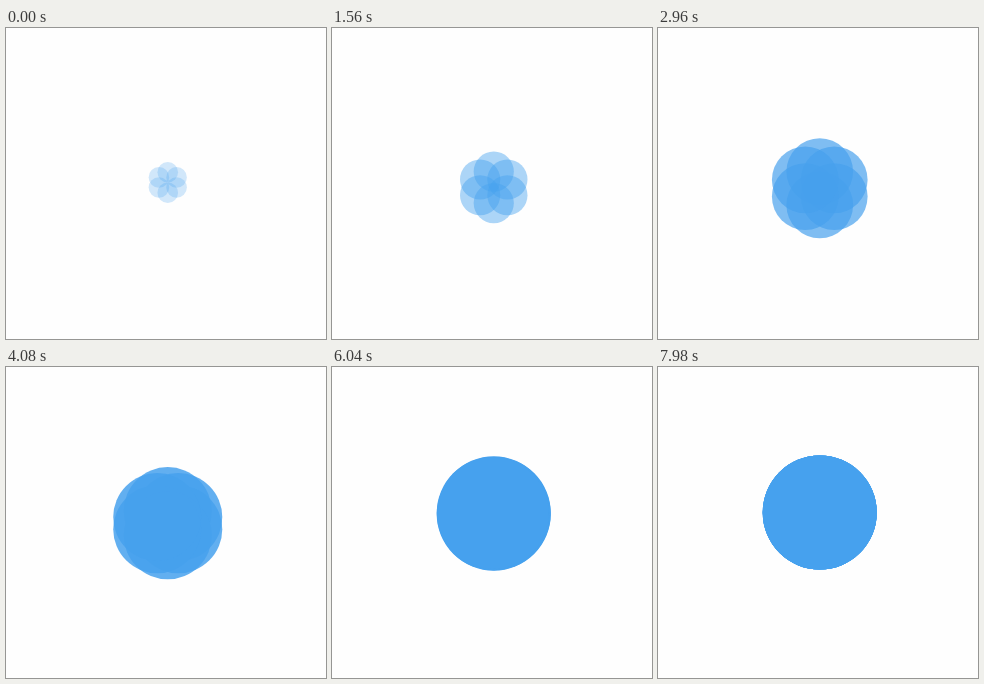
An HTML page that plays this animation: 320 px wide and 311 px high, repeating every 8 s.

```html
<!DOCTYPE html>
<html lang="en">
<head>
<meta charset="utf-8">
<title>Breathing flower</title>
<style>
  html, body { margin: 0; width: 100%; height: 100%; overflow: hidden; background: #fefefe; }
  svg { display: block; width: 100%; height: 100%; }
</style>
</head>
<body>
<svg viewBox="0 0 320 311" fill="#46a1ee"></svg>
<script>
const LOOP = 8;            // seconds
const PETALS = 6;
const FULL_RADIUS = 57;
const CENTER = { x: 161.75, y: 145.5 };

const svg = document.querySelector('svg');
const petals = Array.from({ length: PETALS }, () =>
  svg.appendChild(document.createElementNS('http://www.w3.org/2000/svg', 'circle')));

// Sine ease towards 1, resting there once the flower has closed into a disc.
function growth(seconds) {
  const phase = Math.min(Math.PI / 2, 0.19 + 0.205 * seconds);
  return 1 - 0.85 * Math.cos(phase) ** 2;
}

function draw(seconds) {
  const p = growth(seconds);
  const spread = 69 * p * (1 - p);
  const centerY = CENTER.y + 0.88 * spread;
  const opacity = p * (1.42 - 0.42 * p);

  petals.forEach((petal, i) => {
    const angle = i * 2 * Math.PI / PETALS;
    petal.setAttribute('cx', CENTER.x + spread * Math.sin(angle));
    petal.setAttribute('cy', centerY - spread * Math.cos(angle));
    petal.setAttribute('r', FULL_RADIUS * p);
    petal.setAttribute('fill-opacity', opacity);
  });
}

const start = performance.now();
function tick() {
  draw((performance.now() - start) / 1000 % LOOP);
  requestAnimationFrame(tick);
}
tick();
</script>
</body>
</html>
```
